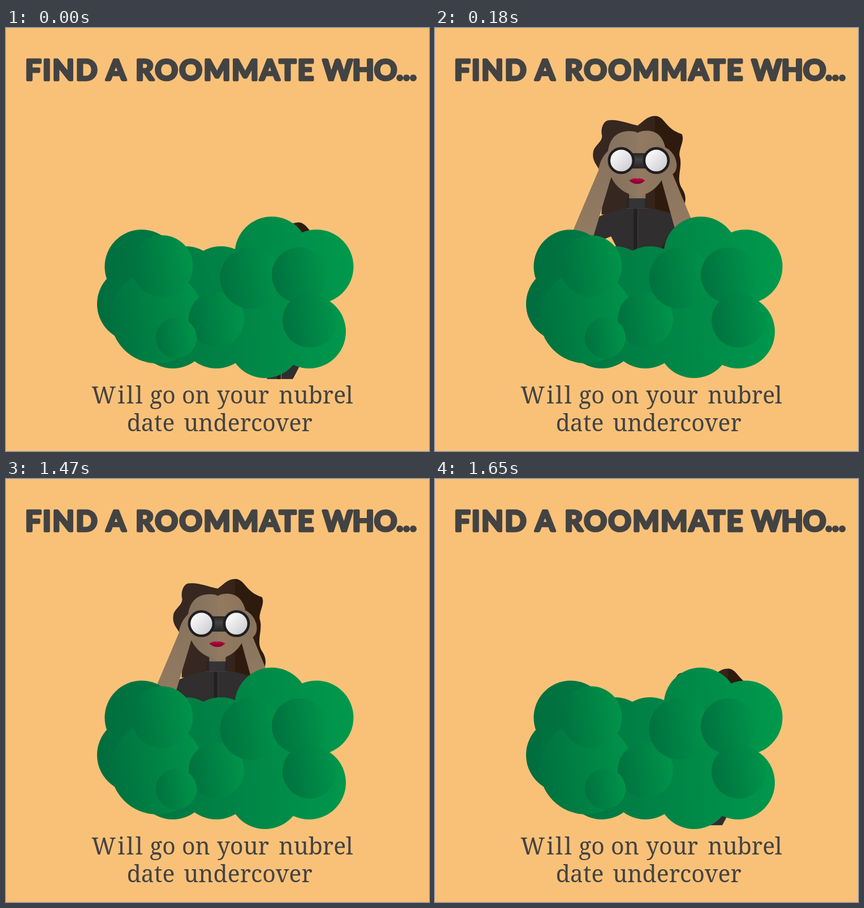
An HTML page for the animation above (2950 ms loop, 748x748 px).

```html
<!DOCTYPE html>
<html lang="en">
<head>
<meta charset="utf-8">
<title>Find a roommate</title>
<style>
  html, body { margin: 0; width: 100%; height: 100%; overflow: hidden; background: #f9c178; }
  svg { display: block; width: 100%; height: 100%; }
  text { fill: #434343; text-anchor: middle; }
  .title { font: 700 50px Lato, sans-serif; stroke: #434343; stroke-width: 4.4; stroke-linejoin: round; letter-spacing: 2.6px; }
  .note { font: 41px "Noto Serif", serif; }
</style>
</head>
<body>
<svg viewBox="0 0 748 748">
  <defs>
    <linearGradient id="bush" gradientUnits="userSpaceOnUse" x1="161" y1="490" x2="615" y2="460">
      <stop stop-color="#006d3e"/><stop offset=".5" stop-color="#008346"/><stop offset="1" stop-color="#00994c"/>
    </linearGradient>
    <linearGradient id="leaf" x1="0" y1=".58" x2="1" y2=".42">
      <stop stop-color="#00713f"/><stop offset="1" stop-color="#00944a"/>
    </linearGradient>
    <linearGradient id="hair">
      <stop offset=".48" stop-color="#362720"/><stop offset=".48" stop-color="#3a281e"/>
      <stop offset=".67" stop-color="#35231a"/><stop offset=".67" stop-color="#2f1b0e"/>
    </linearGradient>
    <linearGradient id="skin">
      <stop stop-color="#85715c"/><stop offset=".5" stop-color="#8d7861"/>
      <stop offset=".5" stop-color="#937b61"/><stop offset="1" stop-color="#8b745c"/>
    </linearGradient>
    <linearGradient id="arm" x1="0" y1="0" x2="0" y2="1">
      <stop stop-color="#86725d"/><stop offset="1" stop-color="#957c62"/>
    </linearGradient>
    <linearGradient id="lens" x1="0" y1="0" x2="1" y2="1">
      <stop offset=".2" stop-color="#f8f8f9"/><stop offset="1" stop-color="#c5c5c8"/>
    </linearGradient>
    <linearGradient id="bridge" x1="0" y1="0" x2="0" y2="1">
      <stop stop-color="#252324"/><stop offset=".4" stop-color="#454344"/><stop offset="1" stop-color="#252324"/>
    </linearGradient>
  </defs>

  <g class="title">
    <text x="99" y="92">FIND</text>
    <text x="196" y="92">A</text>
    <text x="388" y="92">ROOMMATE</text>
    <text x="643" y="92" letter-spacing="0" style="letter-spacing:0">WHO...</text>
  </g>

  <g id="spy">
    <path fill="url(#hair)" d="M284 132C300 129 318 137 337 141C350 131 355 124 369 124C386 126 386 147 415 156
      C421 167 410 181 411 194C418 216 403 234 416 253C424 266 422 276 418 286L410 345Q402 363 374 366L320 300L273 298
      C274 280 277 265 271 248L271 222C264 209 255 203 259 185C263 175 275 169 274 159C271 148 276 134 284 132Z"/>
    <path fill="url(#skin)" d="M322 250H351V272H322Z"/>
    <path fill="url(#skin)" d="M284 200C283 165 300 150 325 151Q333 151 337 154Q343 150 355 150C377 151 388 170 388 200
      C390 240 362 263 337 266C310 263 283 240 284 200Z"/>
    <path fill="#302e2f" d="M316 287L284 295L262 305L245 355L290 337L317 390L312 401H358L365 388L389 340L410 346L404 298L370 289L354 287Z"/>
    <path fill="#282627" d="M317 270H354V287H317Z"/>
    <path fill="#353334" d="M322 270H350V287H322Z"/>
    <path fill="#222021" d="M330 287H337V401H330Z"/>
    <path stroke="#474344" stroke-width="1" d="M316 287.500H354M337.500 288V366"/>
    <path stroke="#b48a59" stroke-width="1" d="M337.500 367V401"/>
    <path fill="url(#arm)" d="M307 177C288 176 270 198 268 220L224 324C219 344 227 357 241 357Q253 356 257 343L290 233
      L301 229L310 203Z"/>
    <path fill="url(#arm)" d="M371 176C392 176 407 195 406 213Q405 223 399 227L440 326C443 343 435 354 425 356
      Q413 356 409 346L378 233L370 225Z"/>
    <path fill="url(#bridge)" d="M326 190H353V217H326Z"/>
    <g fill="url(#lens)" stroke="#211e20" stroke-width="4.600">
      <circle cx="308" cy="203" r="21.500"/><circle cx="370" cy="203" r="21.500"/>
    </g>
    <path fill="#b0073e" d="M322 238Q329 233 336 235Q343 233 350 238Q343 245 336 244Q328 244 322 238Z"/>
    <path fill="#8d0534" d="M322 238Q336 240 350 238Q343 245 336 244Q328 244 322 238Z"/>
  </g>

  <g id="base" fill="url(#bush)"></g>
  <g id="leaves" fill="url(#leaf)"></g>

  <g class="note">
    <text x="198" y="664" letter-spacing="3">Will</text>
    <text x="277" y="664">go</text>
    <text x="336" y="664">on</text>
    <text x="419" y="664">your</text>
    <text x="548" y="664">nubrel</text>
    <text x="256" y="713">date</text>
    <text x="428" y="713">undercover</text>
  </g>
</svg>
<script>
  const get = id => document.getElementById(id);
  const circles = list => list.map(([x, y, r]) => `<circle cx="${x}" cy="${y}" r="${r}"/>`).join("");

  get("base").innerHTML = circles([
    [240, 422, 65.5], [227, 488, 66], [318, 451, 65], [380, 451, 65], [295, 537, 65], [372, 537, 65],
    [440, 500, 88], [470, 399, 65.5], [549, 422, 65.5], [536, 537, 65], [458, 554, 65]
  ]);
  get("leaves").innerHTML = circles([
    [267, 511, 82], [276, 421, 54.5], [372, 515, 49], [301, 548, 36],
    [433, 442, 54.5], [519, 437, 49], [537, 517, 48]
  ]);

  const LOOP = 2950, STEP = 30, DROP = 1440;
  const spy = get("spy");

  // Up in 7 even steps, down in 8, moving along a diagonal.
  function draw(now) {
    const t = now % LOOP;
    let x, y;
    if (t < DROP) {
      const left = 7 - Math.min(7, Math.floor(t / STEP));
      x = left * 21.3;
      y = left * 31.4;
    } else {
      const gone = Math.min(8, Math.floor((t - DROP) / STEP) + 1);
      x = gone * 18.75;
      y = gone * 26.4;
    }
    spy.setAttribute("transform", `translate(${x} ${y})`);
  }

  let start;
  function tick(now) {
    start ??= now;
    draw(now - start);
    requestAnimationFrame(tick);
  }
  draw(0);
  requestAnimationFrame(tick);
</script>
</body>
</html>
```
